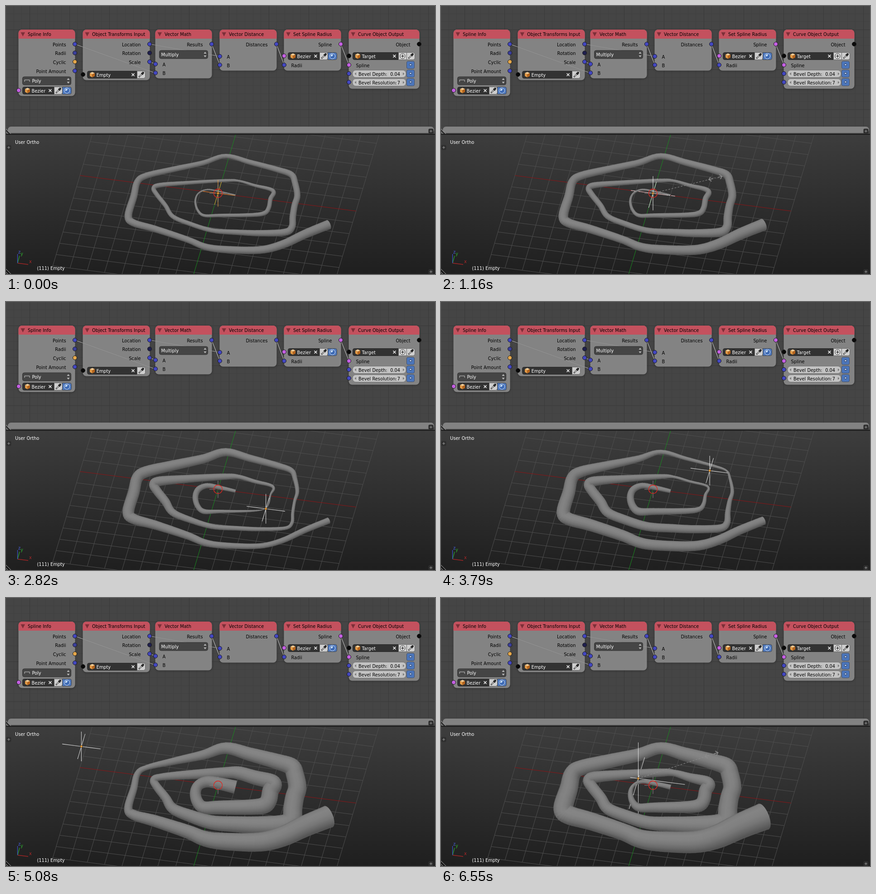
An HTML page with a canvas for the animation above (6590 ms loop, 947x591 px).

```html
<!DOCTYPE html>
<html>
<head>
<meta charset="utf-8">
<style>
html, body { margin: 0; width: 100%; height: 100%; overflow: hidden; background: #444; }
canvas { display: block; }
</style>
</head>
<body>
<canvas id="stage" width="947" height="591"></canvas>
<script>
const W = 947, H = 591, LOOP = 6590, TOP = 284;
const stage = document.getElementById('stage').getContext('2d');
const backdrop = document.createElement('canvas');
backdrop.width = W; backdrop.height = H;
let g = backdrop.getContext('2d');

// Orthographic view: pixels per world unit along each axis
const C = [468, 413], S = 38.9;
const AX = [38.1, 4.9], AY = [7.5, -24.9], AZ = [0, -29.4];
const VIEW = [.146, -.74, .651];
const project = (x, y) => [C[0] + AX[0] * x + AY[0] * y, C[1] + AX[1] * x + AY[1] * y];

// Floor point seen at a pixel, with its depth towards the viewer in pixels
function floorAt(x, y) {
  const X = x - C[0], Y = y - C[1];
  const wx = (24.9 * X + 7.5 * Y) / 985.4, wy = (4.9 * X - 38.1 * Y) / 985.4;
  return { x, y, wx, wy, depth: S * (wx * VIEW[0] + wy * VIEW[1]) };
}

function line(points, color, width = 1, dash = []) {
  g.beginPath();
  points.forEach(p => g.lineTo(p[0], p[1]));
  g.strokeStyle = color; g.lineWidth = width; g.setLineDash(dash);
  g.stroke(); g.setLineDash([]);
}
function poly(points, color) {
  g.beginPath();
  points.forEach(p => g.lineTo(p[0], p[1]));
  g.fillStyle = color; g.fill();
}
function box(x, y, w, h, r, fill, stroke) {
  g.beginPath(); g.roundRect(x, y, w, h, r);
  g.fillStyle = fill; g.fill();
  if (stroke) { g.strokeStyle = stroke; g.lineWidth = 1; g.stroke(); }
}
function dot(x, y, r, fill, stroke, width = 1) {
  g.beginPath(); g.arc(x, y, r, 0, 7);
  if (fill) { g.fillStyle = fill; g.fill(); }
  if (stroke) { g.strokeStyle = stroke; g.lineWidth = width; g.stroke(); }
}
function text(s, x, y, color = '#000', align = 'left') {
  g.font = '9.8px "DejaVu Sans", sans-serif';
  g.textAlign = align; g.fillStyle = color;
  g.fillText(s, x, y);
}

// ---- node editor ----
const BLUE = '#4347c0', PURPLE = '#c45fe2', BLACK = '#0a0a0a';
const BUTTON = '#cfcfcf', ACTIVE = '#4c76bb';

function cross(x, y) {
  line([[x - 3, y - 3], [x + 3, y + 3]], '#eee', 1.6);
  line([[x + 3, y - 3], [x - 3, y + 3]], '#eee', 1.6);
}
function cube(x, y) {
  poly([[x, y - 6], [x + 5.5, y - 3.5], [x, y - 1], [x - 5.5, y - 3.5]], '#f6cf98');
  poly([[x - 5.5, y - 3.5], [x, y - 1], [x, y + 6], [x - 5.5, y + 3]], '#e39a45');
  poly([[x + 5.5, y - 3.5], [x, y - 1], [x, y + 6], [x + 5.5, y + 3]], '#b8651c');
}
function dropper(x, y) {
  box(x, y - 8, 18, 16, [0, 4, 4, 0], BUTTON, '#666');
  line([[x + 4, y + 5], [x + 11, y - 2]], '#222', 3);
  line([[x + 5, y + 4], [x + 10, y - 1]], '#eee', 1.2);
  line([[x + 9, y - 4], [x + 13, y]], '#222', 2);
  dot(x + 13, y - 4, 2.4, '#222');
}
function globe(x, y) {
  box(x, y - 8, 20, 16, [0, 4, 4, 0], ACTIVE, '#444');
  dot(x + 10, y, 6, '#3c69b4', '#dce8f8');
  poly([[x + 7, y - 4], [x + 12, y - 4], [x + 10, y], [x + 6, y + 1]], '#c4dcf4');
}
function field(x, y, w, name) {
  box(x, y - 8, w, 16, [4, 0, 0, 4], '#323232', '#2a2a2a');
  cube(x + 11, y);
  text(name, x + 20, y + 4, '#fff');
  cross(x + w - 9, y);
}
function menu(x, y, name, indent) {
  box(x, y - 9, 107, 18, 4, '#454545', '#303030');
  text(name, x + indent, y + 4, '#fff');
  poly([[x + 98, y - 2], [x + 101, y - 6], [x + 104, y - 2]], '#bbb');
  poly([[x + 98, y + 2], [x + 101, y + 6], [x + 104, y + 2]], '#bbb');
}
function slider(y, name, value) {
  box(765, y - 8, 118, 16, 7, '#c3c3c3', '#777');
  poly([[773, y - 3], [773, y + 3], [769.5, y]], '#777');
  poly([[876, y - 3], [876, y + 3], [879.5, y]], '#777');
  text(name, 778, y + 4);
  text(value, 870, y + 4, '#000', 'right');
}
function toggle(y) {
  box(884.5, y - 8, 17, 16, 3, ACTIVE, '#42506b');
  box(890.5, y - 2.5, 5, 4, 1, '#a9c0e4', '#1c2c4c');
}
function plusButton(x, y) {
  box(x - 5.5, y - 5.5, 11, 11, 3, '#2e2e2e');
  line([[x - 3, y], [x + 3, y]], '#999');
  line([[x, y - 3], [x, y + 3]], '#999');
}

// ins and outs: [label, y, socket colour]
const nodes = [
  { x: 28, w: 124, h: 146, title: 'Spline Info', ins: [['', 186, PURPLE]],
    outs: [['Points', 84, BLUE], ['Radii', 103.5, '#3b3f9a'], ['Cyclic', 123, '#e5a74a'], ['Point Amount', 143, BLUE]] },
  { x: 170, w: 147, h: 111, title: 'Object Transforms Input', ins: [['', 151, BLACK]],
    outs: [['Location', 84, BLUE], ['Rotation', 103.5, '#20204e'], ['Scale', 123, BLUE]] },
  { x: 330, w: 124, h: 107, title: 'Vector Math', ins: [['A', 128, BLUE], ['B', 147.5, BLUE]], outs: [['Results', 84, BLUE]] },
  { x: 472, w: 125, h: 90, title: 'Vector Distance', ins: [['A', 111, BLUE], ['B', 130, BLUE]], outs: [['Distances', 84, BLUE]] },
  { x: 614, w: 125, h: 90, title: 'Set Spline Radius', ins: [['', 110, PURPLE], ['Radii', 130, BLUE]], outs: [['Spline', 84, PURPLE]] },
  { x: 757, w: 155, h: 130, title: 'Curve Object Output',
    ins: [['', 110, BLACK], ['Spline', 130, PURPLE], ['', 149, BLUE], ['', 168, BLUE]], outs: [['Object', 84, BLACK]] }
];

function drawNode(n) {
  g.shadowColor = 'rgba(0,0,0,.4)'; g.shadowBlur = 5; g.shadowOffsetY = 1;
  box(n.x - .5, 52, n.w + 1, n.h + .5, 8, 'rgba(153,153,153,.8)');
  g.shadowColor = 'transparent';
  box(n.x - .5, 52, n.w + 1, 20, [8, 8, 0, 0], '#c4515e');
  poly([[n.x + 4.5, 58], [n.x + 14, 58], [n.x + 9.2, 67]], '#7d2f38');
  text(n.title, n.x + 20, 66);
  for (const [label, y, color] of n.outs) {
    text(label, n.x + n.w - 19.5, y + 4.5, '#000', 'right');
    dot(n.x + n.w, y, 4.5, color, '#181818');
  }
  for (const [label, y, color] of n.ins) {
    text(label, n.x + 15.5, y + 4.5);
    dot(n.x, y, 4.5, color, '#181818');
  }
}

function drawEditor() {
  g.fillStyle = '#454545'; g.fillRect(0, 0, W, TOP);
  for (let i = 0; i < 55; i++) {
    const p = Math.round(17.6 * i) - .5, c = i % 5 == 3 ? '#393939' : '#404040';
    line([[p, 0], [p, 266]], c);
    if (p < 266) line([[0, p], [W, p]], c);
  }
  [[152, 84, 330, 148], [317, 123, 330, 128], [317, 84, 472, 111], [454, 84, 472, 130],
   [597, 84, 614, 130], [739, 84, 757, 130]].forEach(([a, b, c, d]) => {
    line([[a, b], [c, d]], '#2c2c2c', 2.4);
    line([[a, b], [c, d]], '#c4c4c4', 1.2);
  });
  nodes.forEach(drawNode);

  menu(36.5, 165, 'Poly', 21);
  line([[41, 167], [41, 163], [52, 163], [52, 167]], '#ccc');
  field(36.5, 186.5, 70, 'Bezier'); dropper(106.5, 186.5); globe(124.5, 186.5);
  field(179.5, 151.5, 110, 'Empty'); dropper(289.5, 151.5);
  menu(338.5, 107, 'Multiply', 4);
  field(622.5, 110.5, 70, 'Bezier'); dropper(692.5, 110.5); globe(710.5, 110.5);
  field(765.5, 110.5, 101, 'Target');
  box(866.5, 102.5, 18, 16, 0, BUTTON, '#666');
  dot(875.5, 110.5, 5.5, '#eee', '#222');
  line([[872, 110.5], [879, 110.5]], '#222', 1.4);
  line([[875.5, 107], [875.5, 114]], '#222', 1.4);
  dropper(884.5, 110.5);
  [130, 149, 168].forEach(toggle);
  slider(149.5, 'Bevel Depth:', '0.04');
  slider(168.5, 'Bevel Resolution:', '7');

  box(4, 266, 941, 14, 7, '#828282');
  plusButton(938, 276);
  g.fillStyle = '#1c1c1c'; g.fillRect(0, 282, W, 2);
}

// ---- 3D view, still parts ----
function drawView() {
  g.save();
  g.beginPath(); g.rect(0, TOP, W, H - TOP); g.clip();
  const sky = g.createLinearGradient(0, TOP, 0, H);
  sky.addColorStop(0, '#3d3d3d'); sky.addColorStop(1, '#1f1f1f');
  g.fillStyle = sky; g.fillRect(0, TOP, W, H - TOP);
  for (let i = -8; i <= 8; i++) if (i) {
    line([project(i, -8), project(i, 8)], '#4e4e4e');
    line([project(-8, i), project(8, i)], '#4e4e4e');
  }
  line([project(-8, 0), project(8, 0)], '#8c1416');
  line([project(0, -8), project(0, 8)], '#1a8a20');
  g.restore();

  text('User Ortho', 20, 304, '#fff');
  text('(111) Empty', 68.5, 582, '#fff');
  const o = [25.5, 567];
  line([o, [49, 570]], '#a02626', 1.3);
  line([o, [30, 551]], '#2ba02b', 1.3);
  line([o, [25.5, 547]], '#3c50c8', 1.3);
  text('x', 51, 567, '#b02828'); text('y', 32, 550, '#2fae2f'); text('z', 27, 546, '#4860d8');
  plusButton(6, 312); plusButton(938, 586);
  for (const y of [282, 591]) for (const d of [4, 8, 11])
    line([[0, y - d], [d, y]], d == 8 ? '#111' : '#aaa');
}

// ---- spiral tube ----
const knots = [
  506,417, 475,410, 445,405, 425,413, 418,430, 423,450, 437,462, 470,462, 540,461, 570,457,
  580,445, 584,425, 591,412, 583,404, 550,396, 515,386, 485,385, 400,390, 340,395, 326,402,
  333,416, 352,440, 368,464, 405,480, 455,495, 510,499, 560,501, 615,499, 631,488, 633,465,
  637,440, 643,418, 638,390, 630,372, 600,361, 540,345, 485,331, 435,346, 370,360, 310,374,
  290,388, 282,420, 270,462, 281,478, 330,492, 400,515, 440,531, 485,537, 560,538, 610,526,
  660,503, 712,482];
const LIGHT = [-.15, -.5, .85], STOPS = [-1, -.9, -.6, -.2, .2, .6, .9, 1];
const STEPS = 6, SPAN = 3 * STEPS; // samples per knot, and between radius controls

const tube = [];
const last = knots.length / 2 - 1;
const knot = (i, k) => knots[2 * Math.max(0, Math.min(last, i)) + k];
for (let i = 0; i < last; i++) for (let j = 0; j < STEPS + (i == last - 1); j++) {
  const u = j / STEPS;
  const [x, y] = [0, 1].map(k => {
    const [a, b, c, d] = [-1, 0, 1, 2].map(o => knot(i + o, k));
    return b + u / 2 * (c - a + u * (2 * a - 5 * b + 4 * c - d + u * (3 * (b - c) + d - a)));
  });
  tube.push(floorAt(x, y));
}
tube.forEach((p, i) => {
  const a = tube[Math.max(0, i - 1)], b = tube[Math.min(tube.length - 1, i + 1)];
  const dx = b.x - a.x, dy = b.y - a.y, flat = Math.hypot(dx, dy), dz = b.depth - a.depth;
  const len = Math.hypot(flat, dz);
  p.dx = dx / flat; p.dy = dy / flat; p.tilt = dz / len;
  const side = -p.dy * LIGHT[0] + p.dx * LIGHT[1];
  const face = -p.tilt * (p.dx * LIGHT[0] + p.dy * LIGHT[1]) + flat / len * LIGHT[2];
  p.shades = STOPS.map(t => {
    const v = Math.round(84 + 50 * Math.max(0, t * side + Math.sqrt(1 - t * t) * face));
    return `rgb(${v},${v},${v})`;
  });
});
const order = tube.slice(1).map((_, i) => i)
  .sort((a, b) => tube[a].depth - tube[b].depth);

const rim = (p, k, shift) => [p.x - p.dy * p.r * k + p.dx * shift, p.y + p.dx * p.r * k + p.dy * shift];

function shade(p) {
  const grad = g.createLinearGradient(...rim(p, -1, 0), ...rim(p, 1, 0));
  STOPS.forEach((t, i) => grad.addColorStop((t + 1) / 2, p.shades[i]));
  return grad;
}
// Radius is the distance to the empty, blended between control points
function setRadii(empty, scale) {
  const radius = p => .04 * S * Math.hypot(empty.wx - scale * p.wx, empty.wy - scale * p.wy);
  tube.forEach((p, i) => {
    const a = i - i % SPAN, u = (i - a) / SPAN;
    const b = Math.min(a + SPAN, tube.length - 1);
    p.r = Math.max(.6, radius(tube[a]) * (1 - u) + radius(tube[b]) * u);
  });
}
function drawTube() {
  for (const i of order) {
    const p = tube[i], q = tube[i + 1];
    poly([rim(p, -1, -.6), rim(q, -1, .6), rim(q, 1, .6), rim(p, 1, -.6)], shade(p));
    if (i == tube.length - 2) {
      g.beginPath();
      g.ellipse(q.x, q.y, q.r * Math.abs(q.tilt), q.r, Math.atan2(q.dy, q.dx), 0, 7);
      g.fillStyle = shade(q); g.fill();
    }
  }
}

// ---- empty, cursor, scaling handle ----
const covered = (x, y, depth) => tube.some(p => {
  const d = p.r * p.r - (p.x - x) ** 2 - (p.y - y) ** 2;
  return d > 0 && p.depth + Math.sqrt(d) > depth;
});
function drawEmpty({ x, y, depth }, scale, color) {
  [AX, AY, AZ].forEach((axis, i) => {
    const n = Math.ceil(Math.hypot(...axis) * scale);
    g.beginPath();
    for (let j = -n; j < n; j++) {
      const a = j / n * scale, b = (j + 1) / n * scale;
      if (covered(x + axis[0] * a, y + axis[1] * a, depth + a * VIEW[i] * S)) continue;
      g.moveTo(x + axis[0] * a, y + axis[1] * a);
      g.lineTo(x + axis[0] * b, y + axis[1] * b);
    }
    g.strokeStyle = color; g.lineWidth = 1; g.stroke();
  });
}
function drawCursor() {
  const [x, y] = C;
  for (const [a, b] of [[1, 0], [-1, 0], [0, 1], [0, -1]])
    line([[x + 6 * a, y + 6 * b], [x + 19 * a, y + 19 * b]], '#858585');
  dot(x, y, 9.5, null, '#e0251e', 1.3);
}
function drawHandle({ x, y }, angle, dist) {
  g.save();
  g.translate(x, y); g.rotate(angle);
  line([[0, 0], [dist, 0]], '#8c8c8c', 1, [4, 3]);
  for (const s of [-1, 1]) {
    const tip = dist + 15 * s;
    line([[dist + 5 * s, 0], [tip, 0]], '#8c8c8c', 1.6);
    line([[tip - 5 * s, -5], [tip, 0], [tip - 5 * s, 5]], '#8c8c8c', 1.6);
  }
  g.restore();
}

// ---- motion ----
const path = [[2020, 468, 413], [2820, 573.5, 456], [3370, 704, 425], [3790, 593.5, 372], [4480, 364.5, 315],
  [5100, 166, 328], [5450, 264, 350], [5610, 345.5, 362], [6100, 435.5, 398]];
const sizes = [[420, 1], [780, 2.05], [1060, 1.62], [1160, 1.28], [1400, 1.06], [1690, 1.11],
  [6110, 1.11], [6550, 2.7]];

// Smooth curve through the keys that never overshoots them
function track(keys, t, k = 1) {
  const end = keys.length - 1;
  if (t <= keys[0][0]) return keys[0][k];
  if (t >= keys[end][0]) return keys[end][k];
  const i = keys.findIndex(key => key[0] > t) - 1;
  const slope = j => j < 0 || j >= end ? 0 : (keys[j + 1][k] - keys[j][k]) / (keys[j + 1][0] - keys[j][0]);
  const tangent = j => {
    const a = slope(j - 1), b = slope(j);
    return a * b > 0 ? 2 * a * b / (a + b) : 0;
  };
  const h = keys[i + 1][0] - keys[i][0], u = (t - keys[i][0]) / h;
  const e = u * u * (3 - 2 * u);
  return keys[i][k] * (1 - e) + keys[i + 1][k] * e
    + h * u * (1 - u) * ((1 - u) * tangent(i) - u * tangent(i + 1));
}

function draw(t) {
  g = stage;
  g.drawImage(backdrop, 0, 0);
  const empty = floorAt(track(path, t, 1), track(path, t, 2)), scale = track(sizes, t);
  const idle = t < 440 || t >= 1870 && t < 2020;
  g.save();
  g.beginPath(); g.rect(0, TOP, W, H - TOP); g.clip();
  setRadii(empty, scale);
  drawTube();
  drawEmpty(empty, scale, idle ? '#ffa83c' : '#fff');
  drawCursor();
  dot(empty.x, empty.y, 2.4, '#ffac40', '#5a3a10');
  if (t >= 440 && t < 1690) drawHandle(empty, Math.atan2(-34, 139), 111 * scale);
  if (t >= 6120) drawHandle(empty, Math.atan2(-53, 163), 63 * scale);
  g.restore();
}

drawEditor();
drawView();
const start = performance.now();
function tick() {
  draw((performance.now() - start) % LOOP);
  requestAnimationFrame(tick);
}
tick();
</script>
</body>
</html>
```
